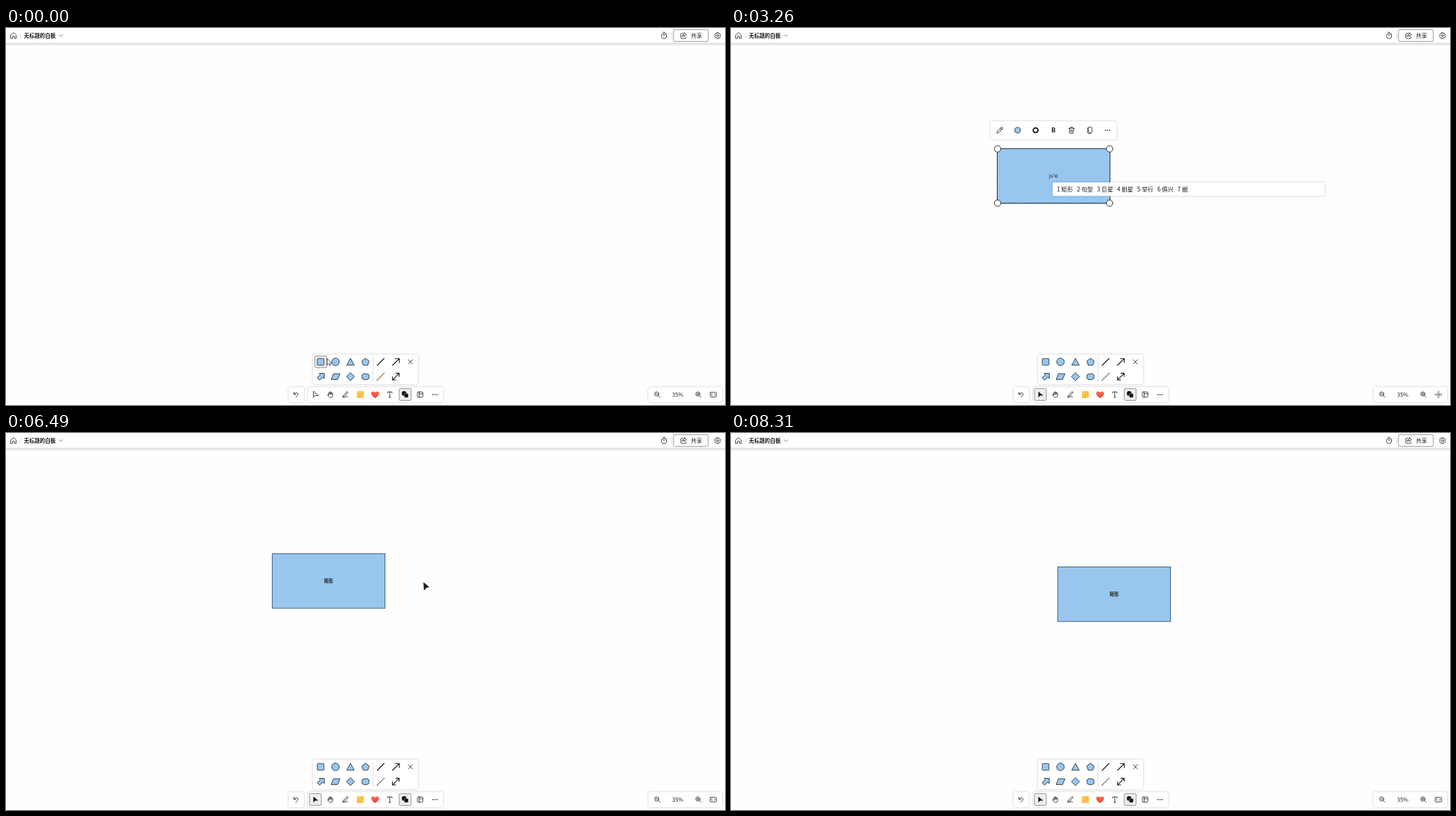
An HTML page that plays this animation: 1033x542 px, repeating every 9110 ms.

```html
<!DOCTYPE html>
<html lang="zh-CN">
<head>
<meta charset="utf-8">
<title>无标题的白板</title>
<style>
  html, body { margin: 0; width: 100%; height: 100%; overflow: hidden; background: #fefefe; }
  svg { display: block; width: 1033px; height: 542px; }
  text { font-family: "Noto Sans CJK SC", "Noto Sans CJK", "Noto Sans", sans-serif; fill: #1b1b1b; }
  .panel { fill: #fff; filter: drop-shadow(0 .8px 1.6px rgba(0,0,0,.24)); }
  .i { fill: none; stroke: #252525; stroke-width: .85; stroke-linecap: round; stroke-linejoin: round; }
  .s { fill: #98c6ee; stroke: #26323c; stroke-width: .9; stroke-linejoin: round; }
  .on { fill: #efefef; stroke: #777; stroke-width: .8; }
  .k { fill: #111; }
  .sep { stroke: #d4d4d4; stroke-width: .8; }
  .m { text-anchor: middle; }
  .b { font-weight: 700; }
  .knob { fill: #fff; stroke: #333; stroke-width: 1; }
</style>
</head>
<body>
<svg viewBox="0 0 1033 542">
  <defs>
    <linearGradient id="fade" x2="0" y2="1">
      <stop stop-color="#000" stop-opacity=".17"/><stop offset="1" stop-color="#000" stop-opacity="0"/>
    </linearGradient>
    <linearGradient id="note" x2="1" y2="1">
      <stop stop-color="#ffd65a"/><stop offset="1" stop-color="#f9a23b"/>
    </linearGradient>
    <linearGradient id="love" x2="0" y2="1">
      <stop stop-color="#fb7048"/><stop offset="1" stop-color="#ee3f3f"/>
    </linearGradient>
    <g id="dots" class="k"><circle cx="-3" r=".85"/><circle r=".85"/><circle cx="3" r=".85"/></g>
    <path id="ptr" d="M-3.4 -4.3V4.2L-.8 1.5H3.7Z"/>
  </defs>

  <rect y="21" width="1033" height="5" fill="url(#fade)"/>
  <rect width="1033" height="21.5" fill="#fff"/>
  <path class="i" d="M7 10 10.8 6.5 14.6 10V15H12.2V11.8H9.4V15H7Z"/>
  <path class="sep" d="M21 7V15M956.5 7V15"/>
  <text class="b" x="25.8" y="13.7" font-size="7.6">无标题的白板</text>
  <path class="i" d="M76 9.6 78.8 12.3 81.6 9.6" style="stroke:#777"/>
  <g class="i"><circle cx="945.3" cy="11.5" r="3.7"/><path d="M944 6.2H946.6M945.3 9.3V11.6M948.5 7.8 949.2 8.4"/></g>
  <rect x="959" y="2.3" width="50" height="17" rx="2" fill="#fff" stroke="#8c8c8c" stroke-width=".9"/>
  <g class="i"><path d="M972.3 7.6H971Q969.6 7.6 969.6 9V13.6Q969.6 15 971 15H975.6Q977 15 977 13.6V13"/><path d="M974.5 6.8 977.8 9.6 974.5 12.2V10.7Q972.6 10.7 971.6 12.4 971.8 8.6 974.5 8.4Z"/></g>
  <text x="984" y="14" font-size="8.1">共享</text>
  <g class="i"><circle cx="1022.3" cy="11" r="1.4"/><path d="M1021.2 6.8H1023.4L1023.8 8.1 1025.2 7.8 1026.5 9.6 1025.6 11 1026.5 12.4 1025.2 14.2 1023.8 13.9 1023.4 15.2H1021.2L1020.8 13.9 1019.4 14.2 1018.1 12.4 1019 11 1018.1 9.6 1019.4 7.8 1020.8 8.1Z"/></g>

  <g id="shape">
    <rect id="box" x="382.5" y="173.5"/>
    <g id="marks">
      <rect x="382.5" y="173.5" width="162" height="78.5" fill="none" stroke="#111" stroke-dasharray="1.5 1"/>
      <g class="knob"><circle cx="383" cy="173.8" r="4.6"/><circle cx="544" cy="173.8" r="4.6"/><circle cx="383" cy="251.8" r="4.6"/><circle cx="544" cy="251.8" r="4.6"/></g>
    </g>
    <text id="label" class="m" x="463.5" y="215.3"></text>
    <path id="caret" stroke="#111" stroke-width=".8"/>
    <g id="bar">
      <rect class="panel" x="373" y="134" width="181" height="26" rx="2.5"/>
      <rect id="hover" x="528" y="134" width="26" height="26" fill="#f0f0f0"/>
      <path class="i" d="M382 151 382.8 148.2 388 143Q389.2 142.2 390 143 390.8 144 390 145L384.8 150.2ZM387 144 389 146"/>
      <circle class="s" cx="411.8" cy="147" r="4.1"/>
      <circle cx="437.6" cy="147" r="3.4" fill="none" stroke="#111" stroke-width="1.9"/>
      <text class="m b" x="463.4" y="150.4" font-size="9">B</text>
      <path class="i" d="M485.2 144.2H493.4M487.8 144V142.6H490.8V144M486.2 144.4 486.8 151.2H491.8L492.4 144.4M488.4 146.4V149.2M490.2 146.4V149.2"/>
      <path class="i" d="M513.6 142.6H517.4Q518.6 142.6 518.6 143.8V149.2Q518.6 150.2 517.4 150.2H514.8Q513.6 150.2 513.6 149.2ZM512.2 144V149.8Q512.4 151.6 514 151.6H517"/>
      <use href="#dots" x="541" y="147"/>
    </g>
  </g>
  <circle id="grip" class="knob" r="4.6"/>

  <g id="menu">
    <rect class="panel" x="373" y="26.5" width="181" height="108" rx="2.5"/>
    <rect x="373" y="132" width="181" height="2" fill="#fff"/>
    <path class="sep" d="M373 134.3H554"/>
    <g font-size="8.7">
      <text x="380.5" y="40.4">重复</text><text x="380.5" y="61.9">编辑可选文字</text>
      <text x="380.5" y="83.4">置于顶层</text><text x="380.5" y="104.9">置于底层</text>
      <text x="380.5" y="126.4">锁定</text>
    </g>
  </g>
  <g id="tip">
    <path d="M541 162 545 166.3H537Z" fill="#3d3d3d"/>
    <rect x="531" y="166" width="20" height="16" rx="1.5" fill="#3d3d3d"/>
    <text class="m b" x="541" y="176.7" font-size="7" style="fill:#fff">更多</text>
  </g>
  <g id="ime">
    <rect id="imeBox" class="panel" x="462" y="222" height="19.5" rx="2"/>
    <text id="words" x="468" y="234.8" font-size="8.4" xml:space="preserve"></text>
  </g>

  <rect class="panel" x="441" y="469.5" width="151" height="42.5" rx="3"/>
  <rect id="rectOn" class="on" x="443.7" y="471.6" width="16.8" height="16.6" rx="1.5"/>
  <g class="s">
    <rect x="447.2" y="475.2" width="9.6" height="9.6" rx="1"/>
    <circle cx="473.4" cy="480" r="5.4"/>
    <path d="M494.9 474.8 500.3 484.8H489.5Z"/>
    <path d="M516.5 474.8 521.7 478.7 519.8 484.8H513.2L511.3 478.7Z"/>
    <path d="M450 496.5H457.3V503.8L454.9 502.2 450.5 506.3 447 502.8 451.5 498.5Z"/>
    <path d="M470.5 497H479.8L476.4 505.4H467.1Z"/>
    <path d="M494.9 495.4 500.7 501.2 494.9 507 489.1 501.2Z"/>
    <rect x="511.2" y="497" width="10.6" height="8.6" rx="4"/>
  </g>
  <path class="sep" d="M527.3 473V509"/>
  <g class="i" style="stroke:#111;stroke-width:1.1">
    <path d="M533.3 485 543.2 475M555.3 485 565 475.3M559.2 475.2H565.1V481.1"/>
    <path d="M533.3 506.3 543.2 496.3" stroke-dasharray=".8 1.9"/>
    <path d="M555.5 505.8 564.7 496.6M560.3 496.4H564.9V501M555.3 501.4V506H559.9"/>
  </g>
  <path class="i" d="M578 476.9 584 482.9M584 476.9 578 482.9"/>

  <rect class="panel" x="406" y="516.3" width="22" height="21.7" rx="3"/>
  <rect class="panel" x="434" y="516.3" width="194" height="21.7" rx="3"/>
  <rect class="panel" x="923" y="516.3" width="106" height="21.7" rx="3"/>
  <path class="i" d="M413.6 523.6V526.6H416.6M413.8 526.4Q416.4 523.2 418.8 525 420.6 527 418.6 528.8L416.4 530.8"/>
  <use id="selOff" class="i" href="#ptr" x="445" y="527"/>
  <g id="selOn"><rect class="on" x="436" y="518.4" width="17" height="17" rx="1.5"/><use href="#ptr" class="k" x="445" y="527"/></g>
  <path class="i" d="M463.7 527.6V524.4Q464.3 523.4 465 524.4V523.4Q465.7 522.4 466.4 523.4V524Q467.2 523 467.9 524.2V525Q468.9 524.2 469.3 525.4V528.4Q469 531.2 466.6 531.2 464.4 531.2 463.2 529.2L461.9 527.2Q462.6 526.2 463.7 527.6M465 524.4V526.8M466.4 524V526.8M467.9 525V527"/>
  <path class="i" d="M484.6 528.6 489.6 523Q491 522.4 491.4 524L486.6 529.4 484.2 530ZM483.6 530.8Q487 532 488 530 489.6 529 491 530.6"/>
  <rect x="504" y="522" width="10" height="10" rx="1.3" fill="url(#note)"/>
  <path d="M509.5 532V528.5Q509.5 527.5 510.5 527.5H514V530.5Q514 532 512.6 532Z" fill="#ffc95a"/>
  <path d="M530.3 532.3Q523.8 527.6 524.7 524.4 526.2 520.8 530.3 523.8 534.4 520.8 535.9 524.4 536.8 527.6 530.3 532.3Z" fill="url(#love)"/>
  <path class="i" d="M548.3 524.8V523.2H554.5V524.8M551.4 523.2V531M550.2 531H552.6"/>
  <rect class="on" x="565" y="518.4" width="17" height="17" rx="1.5"/>
  <circle class="k" cx="572" cy="525.4" r="3.3"/>
  <rect x="572.2" y="525.5" width="5.8" height="5.8" rx="1.2" fill="#111" stroke="#efefef" stroke-width=".4"/>
  <path class="i" d="M592.2 523.2H597.8Q598.9 523.2 598.9 524.3V529.7Q598.9 530.8 597.8 530.8H592.2Q591.1 530.8 591.1 529.7V524.3Q591.1 523.2 592.2 523.2M593.6 523.2V530.8M593.6 525.8H598.9"/>
  <use href="#dots" x="616.4" y="527"/>
  <g class="i">
    <circle cx="934.9" cy="526.2" r="3"/><path d="M937.2 528.4 939.4 530.6M933.5 526.2H936.3"/>
    <circle cx="994" cy="526.2" r="3"/><path d="M996.3 528.4 998.5 530.6M992.6 526.2H995.4M994 524.8V527.6"/>
  </g>
  <text class="m" x="965" y="529.9" font-size="7.8">35%</text>
  <g id="fit" class="i"><rect x="1011.8" y="523.8" width="9" height="6.6" rx="1"/><path d="M1014.6 525.8 1013.3 527.1 1014.6 528.4M1018 525.8 1019.3 527.1 1018 528.4"/></g>
  <g id="focus" class="i"><circle cx="1016.3" cy="527" r="1.6"/><path d="M1014.9 523.8 1016.3 522.5 1017.7 523.8M1014.9 530.2 1016.3 531.5 1017.7 530.2M1013 525.6 1011.6 527 1013 528.4M1019.6 525.6 1021 527 1019.6 528.4"/></g>

  <g id="cursor">
    <path id="white" d="M0 0V9.6L2.2 7.5 3.7 10.7 5 10.1 3.6 7H6.5Z" fill="#fff" stroke="#222" stroke-width=".7"/>
    <rect id="square" x=".2" y="-.2" width="7.4" height="7.4" rx="1" fill="#98c6ee" stroke="#2d4a66"/>
    <path id="black" d="M0 0 7.6 6.4 3.8 7.2.8 11Z" fill="#1c1c1c" stroke="#1c1c1c" stroke-width=".7" stroke-linejoin="round"/>
    <path id="hand" d="M-1 1Q0 -.6 1 1V4.6L4.2 5.2Q5.2 5.6 5 7L4.2 11.6H-.4L-3.4 8Q-3 6.4-1 7.6Z" fill="#fff" stroke="#222" stroke-width=".9" stroke-linejoin="round"/>
    <circle id="glow" r="6.2" fill="#fff02a" opacity=".75"/>
  </g>
</svg>
<script>
const LOOP = 9110, STEP = 60;
const $ = id => document.getElementById(id);
const show = (id, on) => { $(id).style.display = on ? '' : 'none'; };
const move = (id, x, y) => $(id).setAttribute('transform', `translate(${x} ${y})`);
const within = (t, a, b) => t >= a && t < b;

// pointer path: time, x, y
const path = [
  [0, 461.5, 475], [60, 453, 477], [180, 453, 477], [600, 421, 169],
  [780, 421, 169], [960, 382, 173], [1020, 382, 173], [1200, 466, 213],
  [1260, 519, 236], [1320, 540, 249], [1380, 545, 252], [1750, 545, 252],
  [2050, 480, 212], [4350, 480, 212], [4410, 497, 203], [4830, 536.5, 149],
  [5980, 536.5, 149], [6280, 600, 215], [6490, 600, 215], [6790, 515, 224],
  [6910, 515, 224], [6970, 526, 228], [7030, 557, 233], [7150, 595, 241],
  [7210, 602, 243], [7390, 602, 243], [7750, 611, 320], [8010, 611, 320],
  [8310, 1040, 500], [LOOP, 1040, 500]
];

function pointer(t) {
  let k = 0;
  while (k < path.length - 2 && t >= path[k + 1][0]) k++;
  const [t0, x0, y0] = path[k], [t1, x1, y1] = path[k + 1];
  const p = Math.max(0, Math.floor((t - t0) / STEP) * STEP) / (t1 - t0);
  return [x0 + (x1 - x0) * p, y0 + (y1 - y0) * p];
}

const typed = [[2880, 'j'], [2980, 'ju'], [3070, "ju'x"], [3260, "ju'xi"], [3350, "ju'xin"], [3430, "ju'xing"]];

function drawText(t) {
  const key = typed.filter(k => k[0] <= t).pop();
  const composing = within(t, 2880, 3570);
  const hint = t < 2880;
  const label = $('label');
  label.textContent = t < 1500 ? '' : hint ? '添加文本' : composing ? key[1] : '矩形';
  label.setAttribute('font-size', hint ? 6.4 : 6.6);
  label.style.fontWeight = hint || composing ? 400 : 700;
  label.style.fill = hint ? '#48667f' : '#111';
  show('caret', within(t, 2250, 2690) || within(t, 3570, 4110));
  $('caret').setAttribute('d', `M${hint ? 464 : 470.5} 208.5V217`);
  show('ime', composing);
  const wide = t >= 3260;
  $('imeBox').setAttribute('width', wide ? 391 : 313);
  $('words').textContent = wide
    ? '1 矩形   2 句型   3 巨星   4 剧星   5 举行   6 俱兴   7 据'
    : '1 就   2 句   3 具   4 局   5 据   6 举   7 聚';
}

function draw(t) {
  const [x, y] = pointer(t);
  const [lx, ly] = pointer(t - STEP);
  const drawing = within(t, 1020, 1500), made = t >= 1500;

  show('shape', t >= 1020);
  const box = $('box');
  box.setAttribute('width', drawing ? Math.max(0, lx - 382) : 162);
  box.setAttribute('height', drawing ? Math.max(0, ly - 173.5) : 78.5);
  box.setAttribute('fill', drawing ? '#b2d5f2' : '#98c6ee');
  box.setAttribute('stroke', drawing ? '#777f86' : '#47637b');
  show('grip', drawing);
  move('grip', lx, ly);

  // the block trails the pointer by one step while dragged
  const dragged = t >= 7330 ? [87, 19] : t >= 6970 ? [lx - 515, ly - 224] : [0, 0];
  move('shape', ...dragged);

  const selected = within(t, 1500, 6340) || within(t, 6910, 7870);
  const dragging = within(t, 6910, 7330);
  show('marks', selected && !dragging);
  show('bar', within(t, 1690, 6340) || within(t, 7390, 7870));
  drawText(t);

  const onMore = within(t, 4410, 6280) && y < 160;
  show('hover', onMore);
  show('menu', within(t, 5080, 6340));
  show('tip', within(t, 5440, 6040));
  $('tip').style.opacity = Math.min(1, (Math.floor((t - 5440) / STEP) + 1) / 5);

  show('rectOn', !made);
  show('selOn', made);
  show('selOff', !made);
  show('focus', selected);
  show('fit', !selected);

  move('cursor', x, y);
  show('cursor', !within(t, 2880, 4050) && t < 8310);
  const overPanel = t < 600 && y > 465;
  show('white', overPanel);
  show('square', !overPanel && !made);
  show('hand', onMore);
  show('black', made && !onMore);
  const pressed = within(t, 960, 1500) || within(t, 2110, 2250) || within(t, 4890, 5010) ||
    within(t, 6340, 6460) || dragging || within(t, 7810, 7930);
  show('glow', pressed);
  move('black', dragging ? 2 : 0, dragging ? -.5 : 0);
}

let start;
function tick(now) {
  start ??= now;
  draw((now - start) % LOOP);
  requestAnimationFrame(tick);
}
draw(0);
requestAnimationFrame(tick);
</script>
</body>
</html>
```
